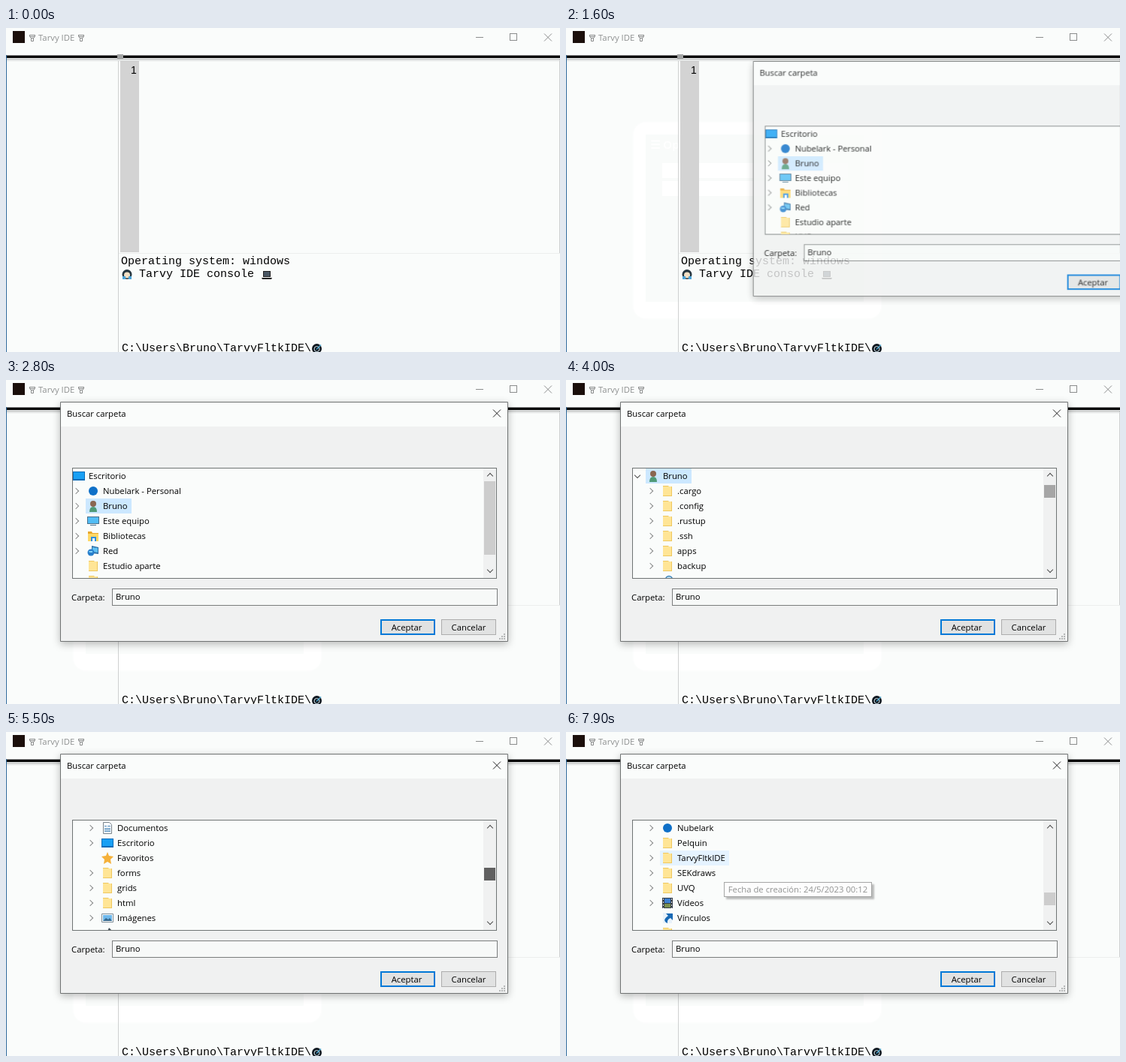
Animation, 737 px wide and 432 px high, one loop 8 s. Source, as an HTML page:

```html
<!DOCTYPE html>
<html lang="es">
<head>
<meta charset="utf-8">
<title>Tarvy IDE</title>
<style>
@property --i { syntax: "<number>"; inherits: true; initial-value: 0; }
html, body { margin: 0; width: 100%; height: 100%; overflow: hidden; background: #fafcfb; }
#stage { position: relative; width: 737px; height: 432px; overflow: hidden; background: #fafcfb;
  font: 11.3px/20px "Open Sans", sans-serif; color: #000; white-space: nowrap; }
#stage div, #stage svg.back { position: absolute; box-sizing: border-box; }
.mono { font: 15px/18px "Liberation Mono", monospace; white-space: pre; }
.anim, .anim * { animation: none 8s step-end infinite; }

/* faint panel behind everything */
#panel { left: 90px; top: 126px; width: 329px; height: 261px; border-radius: 16px;
  background: #fff; box-shadow: 0 0 4px #fff; animation-name: panel; }
#panel div { background: #fff; }
#panel .face { left: 16px; top: 16px; width: 290px; height: 223px; background: #f9fbfa; }
#panel .bar { left: 38px; width: 247px; height: 20px; }
#panel .cap { left: 22px; top: 19px; background: none; color: #fff; font-size: 15px; font-weight: 600; }
@keyframes panel { 0% { opacity: 0 } 6.25% { opacity: .35 } 7.5% { opacity: .7 } 8.75%, 100% { opacity: 1 } }

/* folder dialog */
#dialog { left: 0; top: 0; width: 596px; height: 320px; background: #f0f1f1;
  border-radius: 1px; box-shadow: 0 3px 11px rgba(0,0,0,.27), inset 0 0 0 1px #707373; animation-name: dialog; }
@keyframes dialog {
  0% { opacity: 0; transform: translate(243px, 41px) scale(.95) }
  18.75% { opacity: .4; transform: translate(243px, 41px) scale(.955) }
  20% { opacity: .82; transform: translate(243px, 41px) scale(.981) }
  21.25% { opacity: .97; transform: translate(243px, 41px) scale(.995) }
  22.5% { opacity: 1; transform: translate(243px, 41px) }
  30% { opacity: 1; transform: translate(189px, 40px) }
  31.25% { opacity: 1; transform: translate(150px, 37px) }
  32.5% { opacity: 1; transform: translate(115px, 34px) }
  33.75% { opacity: 1; transform: translate(88px, 31px) }
  35%, 100% { opacity: 1; transform: translate(72px, 29px) }
}
#dialog .title { left: 1px; top: 1px; width: 594px; height: 32px; padding: 5px 8px; background: #fafcfb; }
#dialog .edit { left: 69px; top: 249px; width: 513px; height: 23px; padding-left: 4px; border: 1px solid #7a7d7d;
  background: #f7f9f8; line-height: 19px; }
#dialog .btn { top: 290px; width: 73px; height: 21px; border: 1px solid #adadad; background: #e1e2e2;
  line-height: 19px; text-align: center; }
#dialog .btn.main { border: 2px solid #0078d7; line-height: 18px; padding-right: 3px; }

/* tree */
#dialog .list { left: 16px; top: 88px; width: 565px; height: 148px; border: 1px solid #6f7474; overflow: hidden;
  background: #fafcfb; animation-name: scroll; }
@keyframes scroll {
  0% { --i: 0 } 43.75% { --i: 2 }
  56.25% { --i: 5 } 57.5% { --i: 10 } 58.75% { --i: 14 }
  61.25% { --i: 15 } 62.5% { --i: 16 }
  66.25% { --i: 17 } 67.5% { --i: 18 } 68.75% { --i: 19 } 70% { --i: 20 } 71.25% { --i: 21 }
  75% { --i: 22 } 78.75% { --i: 24 } 80% { --i: 25 }
  83.75% { --i: 26 } 85% { --i: 28 } 86.25% { --i: 29 } 87.5% { --i: 31 } 88.75% { --i: 32 } 90%, 100% { --i: 33 }
}
#tree { left: 0; top: 0; width: 546px; transform: translateY(calc(var(--i) * -20px)); }
#tree .row, #tree .kids { position: relative; }
#tree .row { height: 20px; }
#tree .kids { height: 0; overflow: hidden; animation-name: expand; }
@keyframes expand { 0% { height: 0 } 42.5%, 100% { height: 760px } }
.item { position: absolute; left: calc(var(--lv) * 19px - 2px); height: 20px; padding: 0 5px 0 2px;
  display: flex; align-items: center; gap: 5px; }
.item svg { width: 16px; height: 16px; flex: none; }
.chev { position: absolute; left: calc(var(--lv) * 19px - 18px); top: 7px; width: 5px; height: 5px;
  border: solid #8b8d8d; border-width: 1.4px 1.4px 0 0; transform: rotate(45deg); }
.me .item { background: #cce8ff; }
.me .chev { animation-name: open; }
@keyframes open {
  0% { border-color: #8b8d8d; transform: rotate(45deg) }
  37.5% { border-color: #32b8f0; transform: rotate(45deg) }
  42.5%, 100% { border-color: #444; transform: translate(2px, -1px) rotate(135deg) }
}
.hot .item { animation-name: hot; }
@keyframes hot { 0% { background: none } 93.75%, 100% { background: #e5f3ff } }

#dialog .track { right: 0; top: 0; width: 17px; height: 146px; background: #f0f1f1; }
#dialog .track i { position: absolute; left: 6px; width: 5px; height: 5px; border: solid #505050;
  border-width: 1.5px 0 0 1.5px; transform: rotate(45deg); }
#dialog .thumb { left: 1px; top: calc(17.2px + var(--i) * 2.4px); width: 15px; animation-name: thumb; }
@keyframes thumb {
  0% { height: 98px; background: #cdcdcd }
  42.5% { height: 17px; background: #cdcdcd }
  50% { height: 17px; background: #a6a6a6 }
  53.75% { height: 17px; background: #606060 }
  93.75% { height: 17px; background: #a6a6a6 }
  95%, 100% { height: 17px; background: #cdcdcd }
}
#dialog .tip { left: 138px; top: 171px; width: 197px; height: 20px; border: 1px solid #767676; background: #fff;
  line-height: 18px; text-align: center; color: #575757; box-shadow: 3px 3px 2px rgba(0,0,0,.4); animation-name: tip; }
@keyframes tip {
  0% { opacity: 0 } 95% { opacity: .12 } 96.25% { opacity: .28 } 97.5% { opacity: .45 } 98.75%, 100% { opacity: .64 }
}
</style>
</head>
<body>
<svg width="0" height="0" style="position:absolute">
  <symbol id="folder" viewBox="0 0 16 16"><path fill="#efc75e" d="M2 1h7l1 1h4v13H2z"/><path fill="#ffe596" d="M2 2h11v12H2z"/></symbol>
  <symbol id="disk" viewBox="0 0 16 16"><circle cx="8" cy="8" r="6" fill="#0f70c8"/></symbol>
  <symbol id="user" viewBox="0 0 16 16"><path fill="#4f9a78" d="M3 16q0-7 5-7t5 7z"/><circle cx="8" cy="5" r="4" fill="#8a6652"/></symbol>
  <symbol id="desk" viewBox="0 0 16 16"><path fill="#0b6cb8" d="M0 2h16v12H0z"/><path fill="#19a0f4" d="M1 3h14v9H1z"/></symbol>
  <symbol id="pc" viewBox="0 0 16 16"><path fill="#456f8c" d="M0 2h16v10H0zM4 13h8v1H4z"/><path fill="#52bdf5" d="M1 3h14v8H1z"/></symbol>
  <symbol id="lib" viewBox="0 0 16 16"><path fill="#e8a72c" d="M1 2h5l1 2h8v11H1z"/><path fill="#ffd867" d="M1 5h14v10H1z"/><path fill="#2e8fe0" d="M5 9h7v6H5z"/><path fill="#fff" d="M7 11h3v4H7z"/></symbol>
  <symbol id="net" viewBox="0 0 16 16"><path fill="#2d6fa5" d="M6 1l9 2v9l-9-1z"/><path fill="#5fc0f2" d="M7 3l7 1v6l-7-1z"/><circle cx="5" cy="10" r="4.5" fill="#277fcc"/><path fill="#7fd0f6" d="M2 8h5v2H3z"/></symbol>
  <symbol id="down" viewBox="0 0 16 16"><path fill="#2b8fe4" d="M6 1h4v7h5l-7 7-7-7h5z"/></symbol>
  <symbol id="doc" viewBox="0 0 16 16"><path fill="#fff" stroke="#78848c" d="M2.500 .5h8l3 3v12h-11z"/><path stroke="#4585b8" d="M4 5.500h3M4 8.500h8M4 10.500h8M4 12.500h8M8 5.500h4"/></symbol>
  <symbol id="star" viewBox="0 0 16 16"><path fill="#f5b13a" d="M8 0l2 5 6 1-4 4 1 6-5-3-5 3 1-6-4-4 6-1z"/></symbol>
  <symbol id="pic" viewBox="0 0 16 16"><path fill="#fff" stroke="#7d8c96" d="M.5 2.500h15v11H.5z"/><path fill="#70b9ec" d="M2 4h12v8H2z"/><path fill="#35688d" d="M2 12l4-4 3 2 2-2 3 4z"/></symbol>
  <symbol id="game" viewBox="0 0 16 16"><path fill="#46525c" d="M10 1q6 5 5 8-1 3-4 1l1 4H7V8z"/><path fill="#5d9dca" d="M0 7l6-3 4 3v4l-6 2-4-2z"/></symbol>
  <symbol id="music" viewBox="0 0 16 16"><path fill="none" stroke="#1593e6" stroke-width="2" d="M8 13V1q0 3 4 5v3"/><circle cx="6" cy="13" r="3" fill="#1593e6"/></symbol>
  <symbol id="cube" viewBox="0 0 16 16"><path fill="#35b7c9" d="M8 0l7 4v8l-7 4-7-4V4z"/><path fill="#8be3ec" d="M8 1l6 3-6 4-6-4z"/></symbol>
  <symbol id="film" viewBox="0 0 16 16"><path fill="#333c48" d="M1 1h14v14H1z"/><path fill="#3c7fd0" d="M4 2h8v6H4z"/><path fill="#7b8f4e" d="M4 9h8v5H4z"/><path stroke="#ddd" stroke-dasharray="2" d="M2.500 2v13M13.500 2v13"/></symbol>
  <symbol id="link" viewBox="0 0 16 16"><path fill="#e8f2fa" d="M2 1h12v14H2z"/><path fill="#1769b4" d="M6 2h9v9l-3-3q-5 2-4 7-8-4 1-10z"/></symbol>
  <symbol id="find" viewBox="0 0 16 16"><circle cx="10" cy="6" r="4.500" fill="#c9e8fb" stroke="#3b82b5" stroke-width="1.500"/><path stroke="#3b82b5" stroke-width="2" d="M7 9l-6 6"/></symbol>
</svg>

<div id="stage" class="anim">
  <div id="panel">
    <div class="face"></div>
    <div class="cap">☰ Op</div>
    <div class="bar" style="top:54px"></div>
    <div class="bar" style="top:78px"></div>
  </div>

  <svg class="back" width="737" height="432" shape-rendering="crispEdges">
    <path fill="#d3d3d3" d="M152 43h25v256h-25z"/>
    <path fill="#cfd1d1" d="M149 43h1v389h-1zM736 42h1v258h-1z"/>
    <path fill="#eceeed" d="M150 300h587v1H150z"/>
    <path fill="#2f6a9c" d="M0 36h1v396H0z"/>
    <path fill="#8a8c8c" d="M1 36h736v1H1z"/>
    <path fill="#000" d="M1 37h736v3H1z"/>
    <path fill="#a9abab" d="M1 41h736v1H1z"/>
    <path fill="#d6d8d8" d="M1 43h736v1H1z"/>
    <path fill="#a3a5a5" d="M148 35h8v6h-8z"/>
    <path fill="#1b0f0b" d="M9 4h16v16H9z"/>
    <path fill="none" stroke="#8b8d8d" d="M625 12.500h10M670.500 7.500h9v9h-9z"/>
    <g shape-rendering="auto" fill="none" stroke="#8b8d8d">
      <path d="M716 7.500l10 10M726 7.500l-10 10"/>
      <path id="funnel" d="M31 9.500h8M31.500 9.500v2l2 2v4h3v-4l2-2v-2M32 11.500h6M33 13.500h4"/>
      <use href="#funnel" x="65"/>
    </g>
    <g shape-rendering="auto" transform="translate(0 1)">
      <circle cx="161" cy="327.500" r="6.500" fill="#263640"/><circle cx="161" cy="328.500" r="4" fill="#f2dfc4"/>
      <path fill="#4ba3d8" d="M155 330h4v4h-4zM163 330h4v4h-4z"/>
      <path fill="#222" d="M342 323h10v8h-10zM340 332h14l-1 2h-12z"/><path fill="#4a5864" d="M343 324h8v6h-8z"/>
      <circle cx="413.500" cy="426.500" r="6.500" fill="#101820"/><circle cx="413.500" cy="427" r="3.500" fill="none" stroke="#d5e7ee"/>
      <path stroke="#48a6cf" stroke-width="1.500" d="M413 427.500l6-6"/>
    </g>
  </svg>

  <div style="left:43px;top:3px;color:#8f9191">Tarvy IDE</div>
  <div style="left:166px;top:47px;font:14px/18px 'Liberation Sans',sans-serif">1</div>
  <div class="mono" style="left:153px;top:303px">Operating system: windows</div>
  <div class="mono" style="left:177px;top:320px">Tarvy IDE console</div>
  <div class="mono" style="left:154px;top:419px">C:\Users\Bruno\TarvyFltkIDE\</div>

  <div id="dialog">
    <div class="title">Buscar carpeta</div>
    <svg class="back" width="596" height="320">
      <path stroke="#222" d="M576 10.500l10 10M586 10.500l-10 10"/>
      <path stroke="#b4b6b6" stroke-width="2" stroke-dasharray="2 1" d="M591 309v8M588 312v5M585 315v2"/>
    </svg>
    <div class="list">
      <div id="tree"></div>
      <div class="track">
        <i style="top:7px"></i>
        <div class="thumb"></div>
        <i style="bottom:8px;transform:rotate(225deg)"></i>
      </div>
    </div>
    <div style="left:15px;top:251px">Carpeta:</div>
    <div class="edit">Bruno</div>
    <div class="btn main" style="left:426px">Aceptar</div>
    <div class="btn" style="left:507px">Cancelar</div>
    <div class="tip">Fecha de creación: 24/5/2023 00:12</div>
  </div>
</div>

<script>
// "name:icon"; a leading "-" means no chevron, the default icon is a folder
const roots = ["-Escritorio:desk", "Nubelark - Personal:disk", "Bruno:user", "Este equipo:pc",
  "Bibliotecas:lib", "Red:net", "-Estudio aparte", "-UVQ", "-Varios"];
const kids = [".cargo", ".config", ".rustup", ".ssh", "apps", "backup", "-Búsquedas:find", "builds",
  "canvas", "-Contactos:user", "cipher",
  "CipherPost", "Dune-shelf", "DistributedBondMarketplace", "Demilqora", "-Descargas:down",
  "Documentos:doc", "Escritorio:desk", "-Favoritos:star", "forms", "grids", "html",
  "Imágenes:pic", "-Juegos guardados:game", "lot_marker", "brunovelquez", "QuarterlyMembershipVelmor",
  "-Música:music", "node_modules", "-Objetos 3D:cube", "Nubelark:disk", "Pelquin", "TarvyFltkIDE",
  "SEKdraws", "UVQ", "Vídeos:film", "-Vínculos:link", "-WidePaperBatchMixedShelf"];
const marks = { "Bruno": "me", "TarvyFltkIDE": "hot" };

function row(entry, level) {
  const [name, icon = "folder"] = entry.replace(/^-/, "").split(":");
  const chev = entry[0] === "-" ? "" : '<i class="chev"></i>';
  return `<div class="row ${marks[name] || ""}" style="--lv:${level}">${chev}` +
    `<span class="item"><svg><use href="#${icon}"/></svg>${name}</span></div>`;
}

const children = `<div class="kids">${kids.map(k => row(k, 2)).join("")}</div>`;
document.getElementById("tree").innerHTML =
  roots.map((r, n) => row(r, n ? 1 : 0) + (n === 2 ? children : "")).join("");
</script>
</body>
</html>
```
